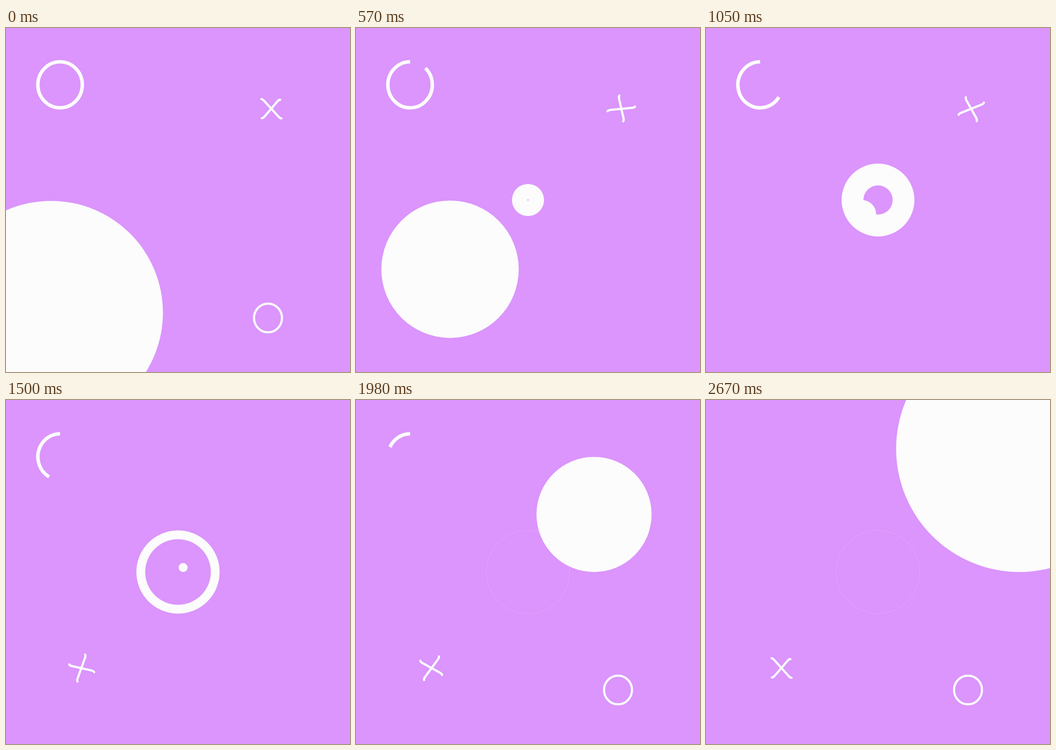
Animation of 748x748 px, one loop 2.7 s. Source, as an HTML page with a canvas:

```html
<!DOCTYPE html>
<html>
<head>
<meta charset="utf-8">
<style>
  html, body { margin: 0; width: 100%; height: 100%; overflow: hidden; background: #db95fc; }
  canvas { display: block; }
</style>
</head>
<body>
<canvas id="stage" width="748" height="748"></canvas>
<script>
const ctx = document.getElementById('stage').getContext('2d');
const PURPLE = '#db95fc', WHITE = '#fcfcfc';
const LOOP = 2700, HALF = 1350, MID = 374, TAU = Math.PI * 2;

const progress = (t, start, end) => Math.min(1, Math.max(0, (t - start) / (end - start)));
const smooth = u => u * u * (3 - 2 * u);

const cross = new Path2D(
  'M-21.5-21.3Q-18.8-21.3-15-17L16 17.5Q19 21 22 21' +
  'M19.5-19.5Q17-20 13.5-16L-14.5 16.5Q-18 20.5-20.8 20.3');

function disc(x, y, r, color) {
  ctx.fillStyle = color;
  ctx.beginPath();
  ctx.arc(x, y, r, 0, TAU);
  ctx.fill();
}

function ring(x, y, rx, ry, width, from = 0) {
  ctx.lineWidth = width;
  ctx.lineCap = 'butt';
  ctx.beginPath();
  ctx.ellipse(x, y, rx, ry, 0, from * TAU - TAU / 4, TAU * 0.75);
  ctx.stroke();
}

function drawBall(t) {
  if (t < HALF) {
    const r = 243 * (1 - smooth(progress(t, 0, HALF)));
    disc(MID - 1.135 * r, MID + 1.008 * r, r, WHITE);
  } else {
    const r = 268 * smooth(progress(t, HALF, 2670));
    disc(MID + 1.147 * r, MID - r, r, WHITE);
  }
}

// Spins one and a half turns back, jumps across, then unwinds.
function drawCross(t) {
  const first = t < HALF;
  const turn = first ? progress(t, 0, 1320) : 1 - progress(t, HALF, 2670);
  ctx.save();
  ctx.translate(first ? 576.8 : 164, first ? 175.7 : 583);
  ctx.rotate(-1.5 * TAU * turn);
  ctx.lineWidth = 4.8;
  ctx.lineCap = 'round';
  ctx.stroke(cross);
  ctx.restore();
}

function draw(t) {
  ctx.fillStyle = PURPLE;
  ctx.fillRect(0, 0, 748, 748);
  ctx.strokeStyle = WHITE;

  disc(MID, MID, 90.5 * smooth(progress(t, 0, HALF)), WHITE);
  disc(MID, MID, 90.5 * smooth(progress(t, 460, 1940)), PURPLE);
  drawBall(t);

  const u = t / LOOP;
  const gap = 0.06 * u + 0.94 * smooth(u);
  if (gap < 0.998) ring(117.6, 123.5, 48.3, 50, 7.6, gap);
  if (Math.floor(t / 300) % 2 === 0) ring(569.7, 630.5, 30.4, 31.2, 4.7);
  drawCross(t);
}

function tick() {
  draw(performance.now() % LOOP);
  requestAnimationFrame(tick);
}
tick();
</script>
</body>
</html>
```
